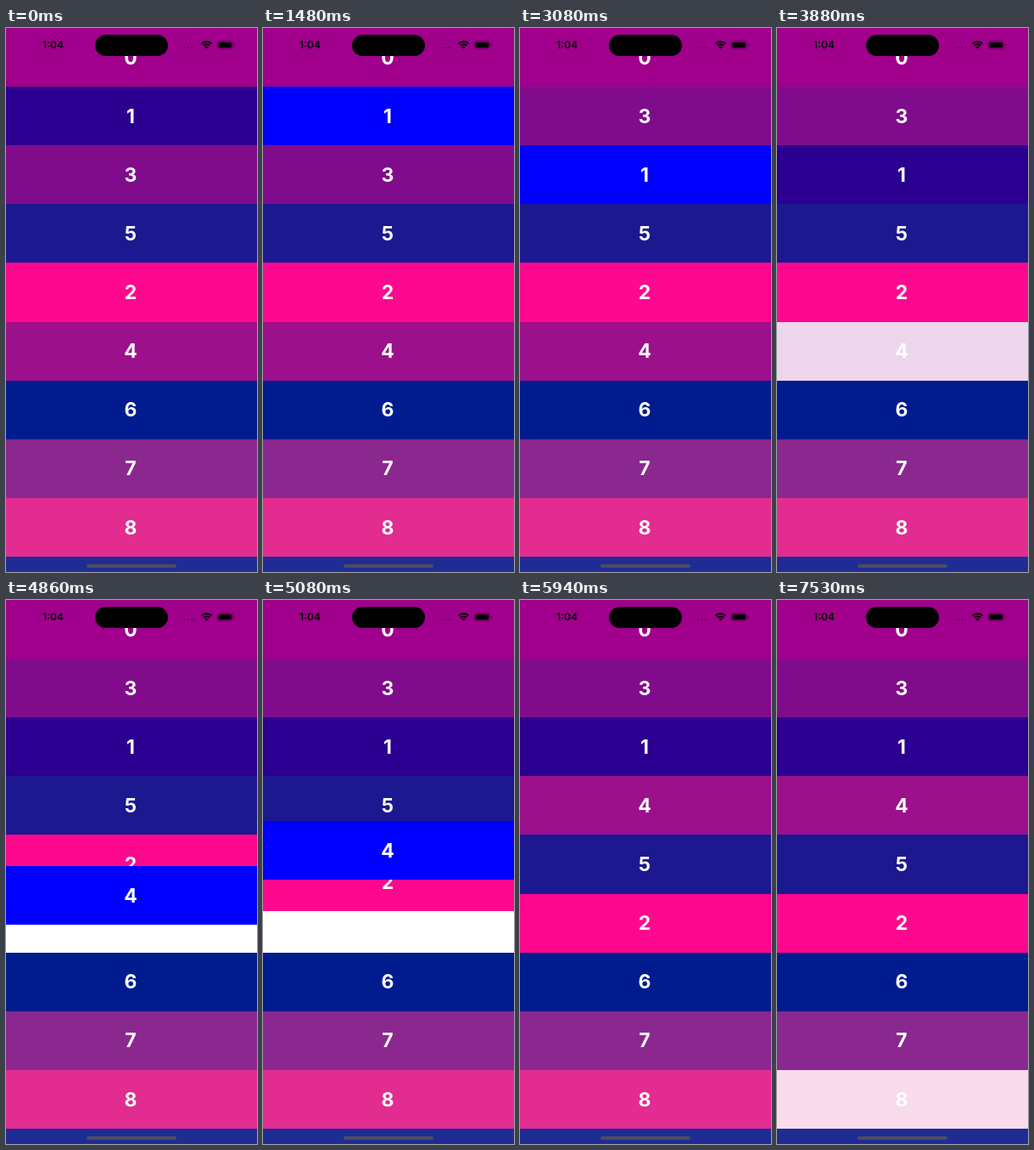
These frames come from a looping animation (296x640 px, 8 s). An HTML page with a canvas:

```html
<!DOCTYPE html>
<html lang="en">
<head>
<meta charset="utf-8">
<title>Reorderable list</title>
<style>
  html, body { margin: 0; width: 100%; height: 100%; overflow: hidden; background: #fff; }
  canvas { display: block; width: 296px; height: 640px; }
</style>
</head>
<body>
<canvas id="stage"></canvas>
<script>
const W = 296, H = 640, ROW = 69.1, LOOP = 8000;
const FONT = 'Inter, Roboto, "Liberation Sans", sans-serif';
const ORDER = [0, 1, 3, 5, 2, 4, 6, 7, 8, 9];
const COLORS = ['#a0008c', '#2b0090', '#ff0890', '#800c8c', '#9c108c',
                '#1b1890', '#001c8e', '#8a2890', '#e22c90', '#1f2c94'];
const LIFTED = '#0000ff';

// Each drag: item, finger travel in px, slots moved, and its timing
const DRAGS = [
  { item: 1, press: 960, lift: 1480, start: 2040, step: 108, drop: 2780, dropStep: 100, reset: 3880,
    travel: 102, slots: 1, ease: smooth, pushed: [[3, 2234]] },
  { item: 4, press: 3880, lift: 4390, start: 4860, step: 110, drop: 5610, dropStep: 110, reset: 5940,
    travel: -127, slots: -2, ease: p => 1 - (1 - p) ** 1.6, pushed: [[2, 4972], [5, 5110]] }
];
const LAST_PRESS = { item: 8, press: 7530 };

const canvas = document.getElementById('stage');
const ctx = canvas.getContext('2d');
const dpr = window.devicePixelRatio || 1;
canvas.width = W * dpr;
canvas.height = H * dpr;
ctx.scale(dpr, dpr);

function smooth(p) { return p * p * (3 - 2 * p); }
function clamp(p) { return Math.min(1, Math.max(0, p)); }

// The screen refreshes in coarse ticks
function held(t, start, step, count) {
  const n = Math.floor((t - start + 4) / step);
  return Math.max(-1, Math.min(count - 1, n));
}

function dragOffset(d, t) {
  const target = d.slots * ROW;
  const drop = held(t, d.drop, d.dropStep, 4) + 1;
  if (drop > 0) return target + (d.travel - target) * (1 - drop / 4) ** 2;
  return d.travel * d.ease((held(t, d.start, d.step, 6) + 1) / 6);
}

function pushOffset(d, begin, t) {
  const now = d.start + held(t, d.start, d.step, 6) * d.step;
  return -Math.sign(d.slots) * ROW * smooth(clamp((now - begin) / 300));
}

function layout(t) {
  const rows = ORDER.map((item, slot) => ({ item, y: slot * ROW, color: COLORS[item], alpha: 1, top: 0 }));
  const find = item => rows.find(r => r.item === item);
  for (const d of DRAGS) {
    const row = find(d.item);
    row.y += dragOffset(d, t);
    if (t >= d.press && t < d.lift) row.alpha = 0.17;
    if (t >= d.lift && t < d.reset) {
      row.color = LIFTED;
      row.top = 1;
    }
    for (const [item, begin] of d.pushed) find(item).y += pushOffset(d, begin, t);
  }
  if (t >= LAST_PRESS.press) find(LAST_PRESS.item).alpha = 0.17;
  return rows.sort((a, b) => a.top - b.top);
}

function label(text, x, y, size, weight, color) {
  ctx.font = `${weight} ${size}px ${FONT}`;
  ctx.textAlign = 'center';
  ctx.fillStyle = color;
  ctx.fillText(text, x, y);
}

function drawRow({ item, y, color, alpha }) {
  const top = Math.round(y), bottom = Math.round(y + ROW);
  ctx.fillStyle = '#fff';
  ctx.fillRect(0, top, W, bottom - top);
  ctx.globalAlpha = alpha;
  ctx.fillStyle = color;
  ctx.fillRect(0, top, W, bottom - top);
  ctx.globalAlpha = 1;
  label(item, 147, y + ROW / 2 + 8.2, 23, 700, '#fff');
}

function pill(x, y, w, h, r, color) {
  ctx.fillStyle = color;
  ctx.beginPath();
  ctx.roundRect(x, y, w, h, r);
  ctx.fill();
}

function drawWifi(x, y) {
  const a = Math.PI * 0.25;
  ctx.strokeStyle = '#000';
  ctx.lineWidth = 2;
  for (const r of [8.6, 5.4]) {
    ctx.beginPath();
    ctx.arc(x, y, r, -Math.PI / 2 - a, -Math.PI / 2 + a);
    ctx.stroke();
  }
  ctx.fillStyle = '#000';
  ctx.beginPath();
  ctx.moveTo(x, y);
  ctx.arc(x, y, 3, -Math.PI / 2 - a, -Math.PI / 2 + a);
  ctx.fill();
}

function drawChrome() {
  pill(105, 8, 86, 25, 12.5, '#000');
  label('1:04', 55.5, 24.3, 12, 600, '#000');
  for (let i = 0; i < 4; i++) pill(209.5 + i * 4, 22, 2, 2, 1, 'rgba(0,0,0,.35)');
  drawWifi(236.5, 24.6);
  ctx.strokeStyle = 'rgba(0,0,0,.4)';
  ctx.lineWidth = 0.8;
  ctx.beginPath();
  ctx.roundRect(249, 15.4, 18.6, 9.2, 3);
  ctx.stroke();
  pill(250.3, 16.7, 16, 6.6, 1.8, '#000');
  pill(268.6, 18.5, 1.1, 3, 0.5, 'rgba(0,0,0,.4)');
  pill(95, 631, 106, 4, 2, '#4d4d5c');
}

function draw(t) {
  ctx.fillStyle = '#fff';
  ctx.fillRect(0, 0, W, H);
  layout(t).forEach(drawRow);
  drawChrome();
}

const origin = performance.now();
function frame() {
  draw((performance.now() - origin) % LOOP);
  requestAnimationFrame(frame);
}
frame();
</script>
</body>
</html>
```
